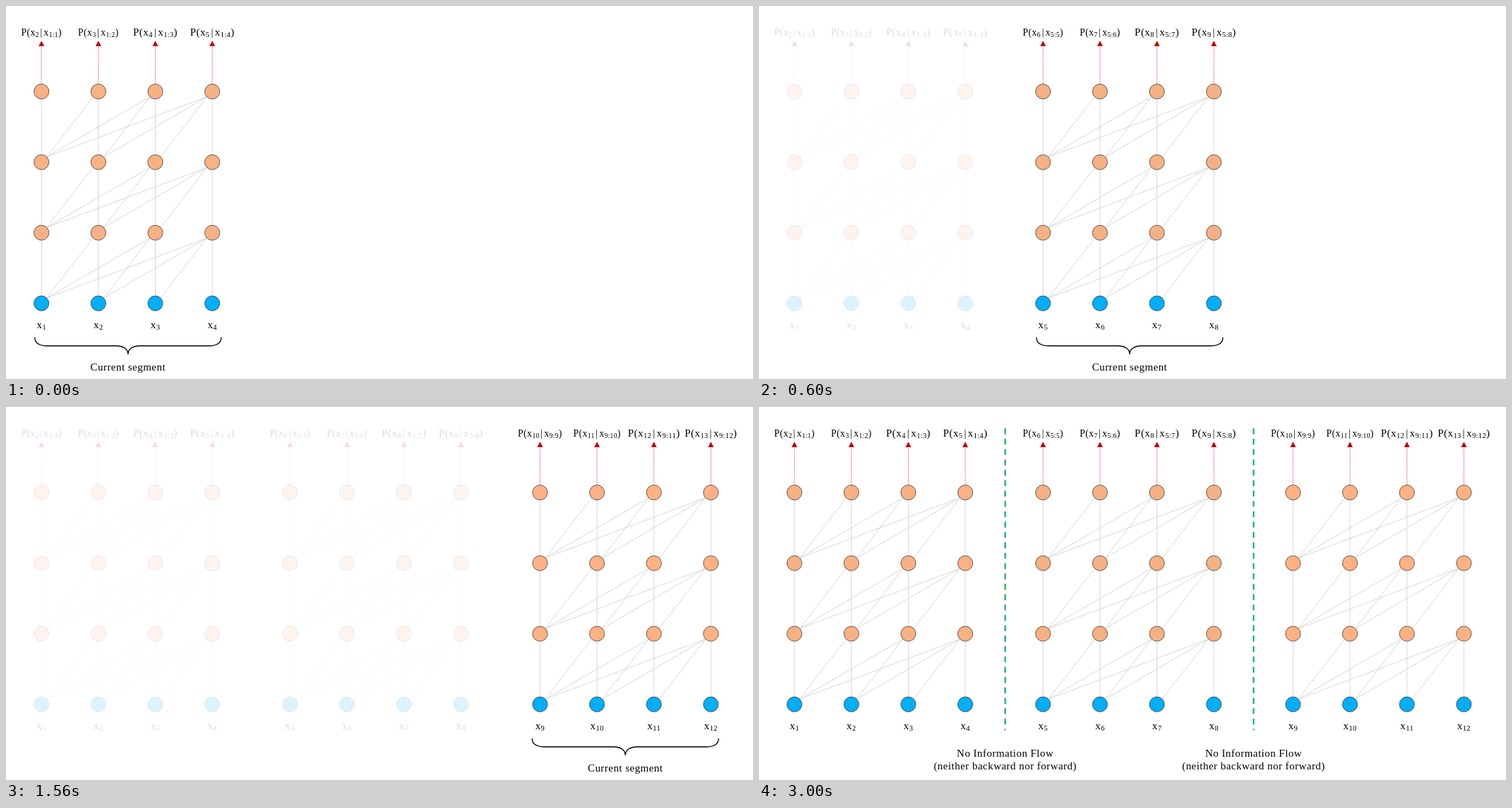
An HTML page for the animation above (3.8 s loop, 1058 by 529 pixels).

```html
<!DOCTYPE html>
<html lang="en">
<head>
<meta charset="utf-8">
<title>Segment training</title>
<style>
  html, body { margin: 0; width: 100%; height: 100%; overflow: hidden; background: #fff; }
  svg { display: block; width: 1058px; height: 529px; }
  text, tspan { letter-spacing: .031em; }
  text { font-family: "Liberation Serif", "Times New Roman", serif; font-size: 15px; text-anchor: middle; }
  .small { font-size: 13.7px; }
  .sub { font-size: .7em; }
  .link { stroke: #cdcdcd; stroke-width: .8; fill: none; }
  .node { stroke: #3c3c3c; stroke-width: .8; }
  .stem { stroke: #d42020; stroke-width: .8; stroke-dasharray: 1.6 1.4; }
  .head { fill: #c00000; }
  .brace { fill: none; stroke: #000; stroke-width: 1.3; }
  .wall { stroke: #0cae50; stroke-width: 2.1; stroke-dasharray: 8.4 6.3; }

  .net, .now, .end { animation: 3800ms step-end infinite; }
  #net0 { animation-name: net0; }
  #net1 { animation-name: net1; }
  #net2 { animation-name: net2; }
  #now0 { animation-name: now0; }
  #now1 { animation-name: now1; }
  #now2 { animation-name: now2; }
  .end { animation-name: end; }
  @keyframes net0 { 0% { opacity: 1 } 15.789% { opacity: .14 } 47.368%, 100% { opacity: 1 } }
  @keyframes net1 { 0% { opacity: 0 } 15.789% { opacity: 1 } 31.578% { opacity: .14 } 47.368%, 100% { opacity: 1 } }
  @keyframes net2 { 0% { opacity: 0 } 31.578%, 100% { opacity: 1 } }
  @keyframes now0 { 0% { opacity: 1 } 15.789%, 100% { opacity: 0 } }
  @keyframes now1 { 0% { opacity: 0 } 15.789% { opacity: 1 } 31.578%, 100% { opacity: 0 } }
  @keyframes now2 { 0% { opacity: 0 } 31.578% { opacity: 1 } 47.368%, 100% { opacity: 0 } }
  @keyframes end { 0% { opacity: 0 } 47.368%, 100% { opacity: 1 } }
</style>
</head>
<body>
<svg id="stage" viewBox="0 0 1058 529"></svg>
<script>
  const GAP = 80.65, R = 10.6, EDGE = R * Math.SQRT1_2;
  const left = [50.2, 402.3, 756.4];
  const rows = [121.3, 221.5, 321.6, 421.7];
  const orange = ['#f8b183', '#f4b183', '#ffb183'];
  const blue = '#00aff8';

  const text = (x, y, body, cls = '') => `<text x="${x}" y="${y}" class="${cls}">${body}</text>`;
  const sub = s => `<tspan class="sub" dy="2.4">${s}</tspan>`;
  const up = (s, dx = 0) => `<tspan dx="${dx}em" dy="-2.4">${s}</tspan>`;
  const bar = `${up('|', .13)}<tspan dx=".13em">x</tspan>`;

  function net(g) {
    const col = i => left[g] + i * GAP;
    let links = '', nodes = '', labels = '';
    for (let r = 1; r < 4; r++) {
      for (let a = 0; a < 4; a++) {
        links += `M${col(a)} ${rows[r] - R}V${rows[r - 1] + R}`;
        for (let b = a + 1; b < 4; b++) {
          links += `M${col(a) + EDGE} ${rows[r] - EDGE}L${col(b) - EDGE} ${rows[r - 1] + EDGE}`;
        }
      }
    }
    for (let i = 0; i < 4; i++) {
      const x = col(i), first = 4 * g + 1, n = first + i;
      rows.forEach((y, r) => {
        nodes += `<circle class="node" cx="${x}" cy="${y}" r="${R}" fill="${r < 3 ? orange[g] : blue}"/>`;
      });
      labels += `<path class="stem" d="M${x} 110.5V57"/>`
        + `<path class="head" d="M${x} 49.3l4 7.6h-8z"/>`
        + text(x, 41.8, `P(x${sub(n + 1)}${bar}${sub(first + ':' + n)}${up(')')}`, i < 2 ? 'small' : '')
        + text(x, 457, 'x' + sub(n));
    }
    return `<g class="net" id="net${g}"><path class="link" d="${links}"/>${nodes}${labels}</g>`;
  }

  function now(g) {
    const x = 172.8 + g * 352.2;
    return `<g class="now" id="now${g}">
      <path class="brace" d="M${x - 132} 470c0 8 7 12 18 12h97c10 0 17 4 17 12c0-8 7-12 17-12h97c11 0 18-4 18-12"/>
      ${text(x, 517.3, 'Current segment')}</g>`;
  }

  const wall = x => `<g class="end"><path class="wall" d="M${x} 30.3V458.5"/>
    ${text(x, 496.3, 'No Information Flow')}
    ${text(x, 514, '(neither backward nor forward)')}</g>`;

  document.getElementById('stage').innerHTML =
    [0, 1, 2].map(g => net(g) + now(g)).join('') + wall(348.7) + wall(700.5);
</script>
</body>
</html>
```
